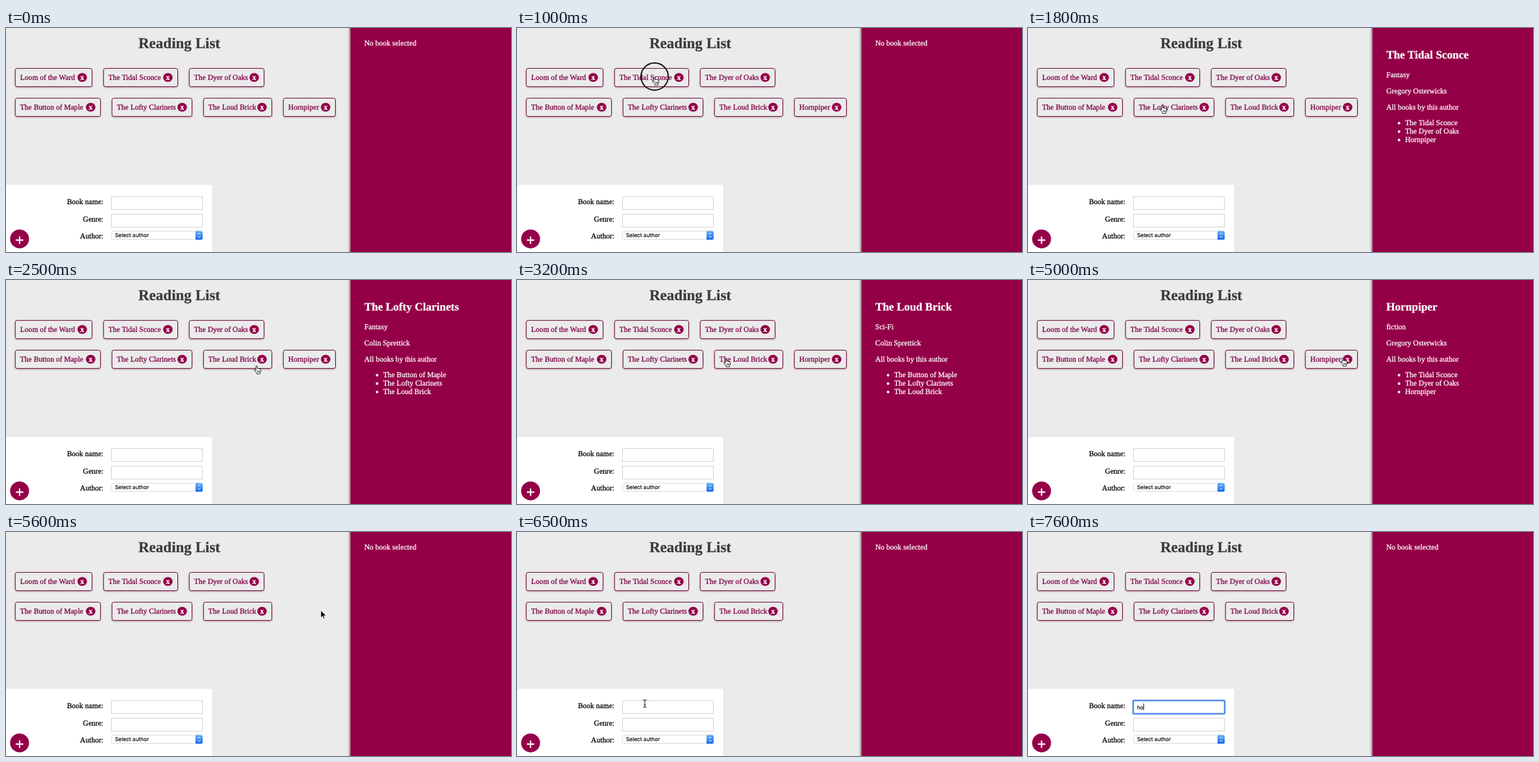
These frames come from a looping animation (778x346 px, 8 s). An HTML page:

```html
<!DOCTYPE html>
<html lang="en">
<head>
<meta charset="utf-8">
<title>Reading List</title>
<style>
  html, body { margin: 0; width: 100%; height: 100%; overflow: hidden; background: #ebebeb; }
  svg { display: block; width: 778px; height: 346px; color: #000; }
  text {
    font: 11.55px "Liberation Serif", "Times New Roman", serif; white-space: pre;
    fill: currentColor; stroke: currentColor; stroke-width: .28; text-rendering: geometricPrecision;
  }
  .title { font-size: 23.04px; font-weight: bold; color: #3b3b3b; text-anchor: middle; }
  .book { color: #7d0042; }
  .book rect { fill: #ebebeb; stroke: #6c0a3c; filter: drop-shadow(.7px 1.4px 1px rgba(90,0,45,.38)); }
  .book ellipse, .add circle, .side { fill: #940048; }
  .book .x { color: #fff; font-weight: bold; text-anchor: middle; }
  .side { filter: drop-shadow(-1.4px -2px 1.8px rgba(0,0,0,.35)); }
  #panel { color: #fff; fill: #fff; }
  #panel .head { font-size: 17.28px; font-weight: bold; }
  .label { text-anchor: end; }
  .field { fill: #fff; stroke: #d3d3d3; }
  .ui { font: 8px Inter, "Liberation Sans", sans-serif; stroke-width: .15; }
  .add path { stroke: #fff; stroke-width: 2.1; }
  #focus { fill: none; stroke: #548de6; stroke-width: 2.6; }
  #ring { fill: none; stroke: #111; stroke-width: 2; }
</style>
</head>
<body>
<svg viewBox="0 0 778 346">
  <defs>
    <linearGradient id="blue" x2="0" y2="1">
      <stop stop-color="#6cb0fa"/><stop offset="1" stop-color="#1668ee"/>
    </linearGradient>
  </defs>
  <rect width="778" height="346" fill="#ebebeb"/>
  <text class="title" x="267" y="31">Reading List</text>
  <g id="books"></g>
  <rect class="side" x="530.6" y="0" width="250" height="350"/>
  <g id="panel"></g>

  <rect y="242.5" width="317.5" height="104" fill="#fff"/>
  <text class="label" x="150" y="272">Book name:</text>
  <text class="label" x="150" y="298.5">Genre:</text>
  <text class="label" x="150" y="325">Author:</text>
  <rect class="field" x="162.5" y="260.5" width="140" height="20"/>
  <rect class="field" x="162.5" y="287.5" width="140" height="20"/>
  <rect id="focus" x="162" y="260.2" width="141" height="20.6" rx="1"/>
  <text id="typed" class="ui" x="168" y="273.5"></text>
  <rect id="caret" y="265" width="1" height="10"/>
  <rect x="162.5" y="314" width="140" height="12.5" rx="2.5" fill="#fff" stroke="#d2d2d2" stroke-width=".8"/>
  <text class="ui" x="168" y="323" style="font-size:8.3px">Select author</text>
  <path d="M292 313.5h8.5q2.5 0 2.5 2.5v8.5q0 2.5-2.5 2.5h-8.5z" fill="url(#blue)"/>
  <path d="M295.6 318.8l1.9-2 1.9 2M295.6 321.7l1.9 2 1.9-2" fill="none" stroke="#fff"/>
  <g class="add"><circle cx="20.9" cy="325.8" r="14.6"/><path d="M15.2 327.6h11.4M20.9 322v11.4"/></g>

  <circle id="ring"/>
  <g id="cursor">
    <path id="arrow" d="M0 0V11.4L2.6 9 4.3 12.8 6.2 12 4.6 8.2H8.2Z" stroke="#fff" stroke-width=".8"/>
    <path id="hand" transform="translate(-4 -1)" fill="#fff" stroke="#111" stroke-width=".9" stroke-linejoin="round"
      d="M3 7.6V1.7Q3 .5 4 .5T5 1.7V5Q5.2 4.1 6 4.2T6.9 5.1Q7.2 4.5 8 4.6T8.8 5.6Q10.5 4.8 10.5 6.6V9Q10.3 10.5 9.4 11.4V13H4.2V11.6Q2.4 9.8 .6 7.2Q.4 5.8 1.6 6.2ZM5.4 8.2v2.4M7 8.2v2.4M8.5 8.2v2.4"/>
    <path id="beam" d="M-2.8-6Q-.3-6 0-4.6Q.3-6 2.8-6M0-5V5M-2.8 6Q-.3 6 0 4.6Q.3 6 2.8 6M-1.3 2H1.3" fill="none" stroke="#111"/>
  </g>
</svg>
<script>
const $ = id => document.getElementById(id);

// title, left, top, width, genre, author
const books = [
  ["Loom of the Ward", 14, 62, 119],
  ["The Tidal Sconce", 150, 62, 115, "Fantasy", "Gregory Osterwicks"],
  ["The Dyer of Oaks", 282, 62, 116, "Fantasy", "Gregory Osterwicks"],
  ["The Button of Maple", 14, 108, 132, "Fantasy", "Colin Sprettick"],
  ["The Lofty Clarinets", 163, 108, 124, "Fantasy", "Colin Sprettick"],
  ["The Loud Brick", 304, 108, 106, "Sci-Fi", "Colin Sprettick"],
  ["Hornpiper", 427, 108, 81, "fiction", "Gregory Osterwicks"]
];
const REMOVED = 5300;

// time, selected book
const picks = [[0, -1], [1100, 1], [2100, 4], [3100, 5], [4300, 6], [REMOVED, -1]];

// time, x, y of the pointer
const route = [
  [100, 768, 3], [900, 212, 76], [1200, 212, 76], [1800, 207, 120], [2200, 207, 120],
  [2500, 386, 133], [2900, 322, 122], [3200, 322, 122], [3600, 449, 121], [3700, 433, 122],
  [3800, 442, 123], [4400, 442, 123], [4900, 485, 121], [5700, 485, 121], [6400, 197, 265]
];

// time, radius
const rings = [[1000, 21], [1100, 15], [2000, 21], [2100, 15], [3000, 21], [3100, 15],
  [4100, 21], [4200, 15], [5100, 21], [5200, 15], [6600, 15]];

const label = (x, y, s, cls = "") => `<text x="${x}" y="${y}" class="${cls}">${s}</text>`;
const show = (el, on) => { el.style.display = on ? "" : "none"; };
const latest = (list, t) => list.filter(k => k[0] <= t).pop();

$("books").innerHTML = books.map(([name, x, y, w]) => `<g class="book">
  <rect x="${x + .3}" y="${y + .4}" width="${w - .8}" height="28.2" rx="3"/>
  ${label(x + 7.8, y + 18, name)}
  <ellipse cx="${x + w - 15.6}" cy="${y + 14.4}" rx="7.3" ry="6.8"/>
  ${label(x + w - 15.6, y + 17.7, "x", "x")}</g>`).join("");

function panel(i) {
  if (i < 0) return label(552, 27, "No book selected");
  const [name, , , , genre, author] = books[i];
  const list = books.filter(b => b[5] === author).map((b, n) =>
    `<circle cx="571.6" cy="${147 + n * 13}" r="2"/>` + label(581, 150 + n * 13, b[0]));
  return label(552, 47, name, "head") + label(552, 76, genre) + label(552, 101, author) +
    label(552, 125.5, "All books by this author") + list.join("");
}

function pointer(t) {
  const i = route.findIndex(k => k[0] > t);
  if (i < 0) return route[route.length - 1].slice(1);
  const [t0, x0, y0] = route[Math.max(0, i - 1)], [t1, x1, y1] = route[i];
  const p = t1 > t0 ? (t - t0) / (t1 - t0) : 0, e = p * p * (3 - 2 * p);
  return [x0 + (x1 - x0) * e, y0 + (y1 - y0) * e];
}

let selected;
function draw(t) {
  const pick = latest(picks, t)[1];
  if (pick !== selected) $("panel").innerHTML = panel(selected = pick);
  show($("books").lastElementChild, t < REMOVED);

  const [x, y] = pointer(t);
  const inside = (l, u, w, h) => x >= l && x <= l + w && y >= u && y <= u + h;
  const onBook = books.some((b, i) => (i < 6 || t < REMOVED) && inside(b[1], b[2], b[3], 29));
  const onField = inside(162, 260, 141, 21);
  show($("cursor"), t >= 100 && t < 7400);
  $("cursor").setAttribute("transform", `translate(${x} ${y})`);
  show($("hand"), onBook);
  show($("beam"), onField);
  show($("arrow"), !onBook && !onField);

  const ring = rings.find(k => k[0] === t);
  $("ring").setAttribute("cx", x);
  $("ring").setAttribute("cy", y - 1);
  $("ring").setAttribute("r", ring ? ring[1] : 0);
  show($("ring"), ring);

  const typed = t < 7400 ? "" : t < 7600 ? "h" : "ho";
  $("typed").textContent = typed;
  $("caret").setAttribute("x", [167.6, 172.8, 177.6][typed.length]);
  show($("caret"), t >= 6600 && t < 7100 || t >= 7400);
  show($("focus"), t >= 6600);
}

const start = performance.now();
function tick() {
  const t = (performance.now() - start) % 8000;
  draw(Math.floor(t / 100) * 100);
  requestAnimationFrame(tick);
}
tick();
</script>
</body>
</html>
```
